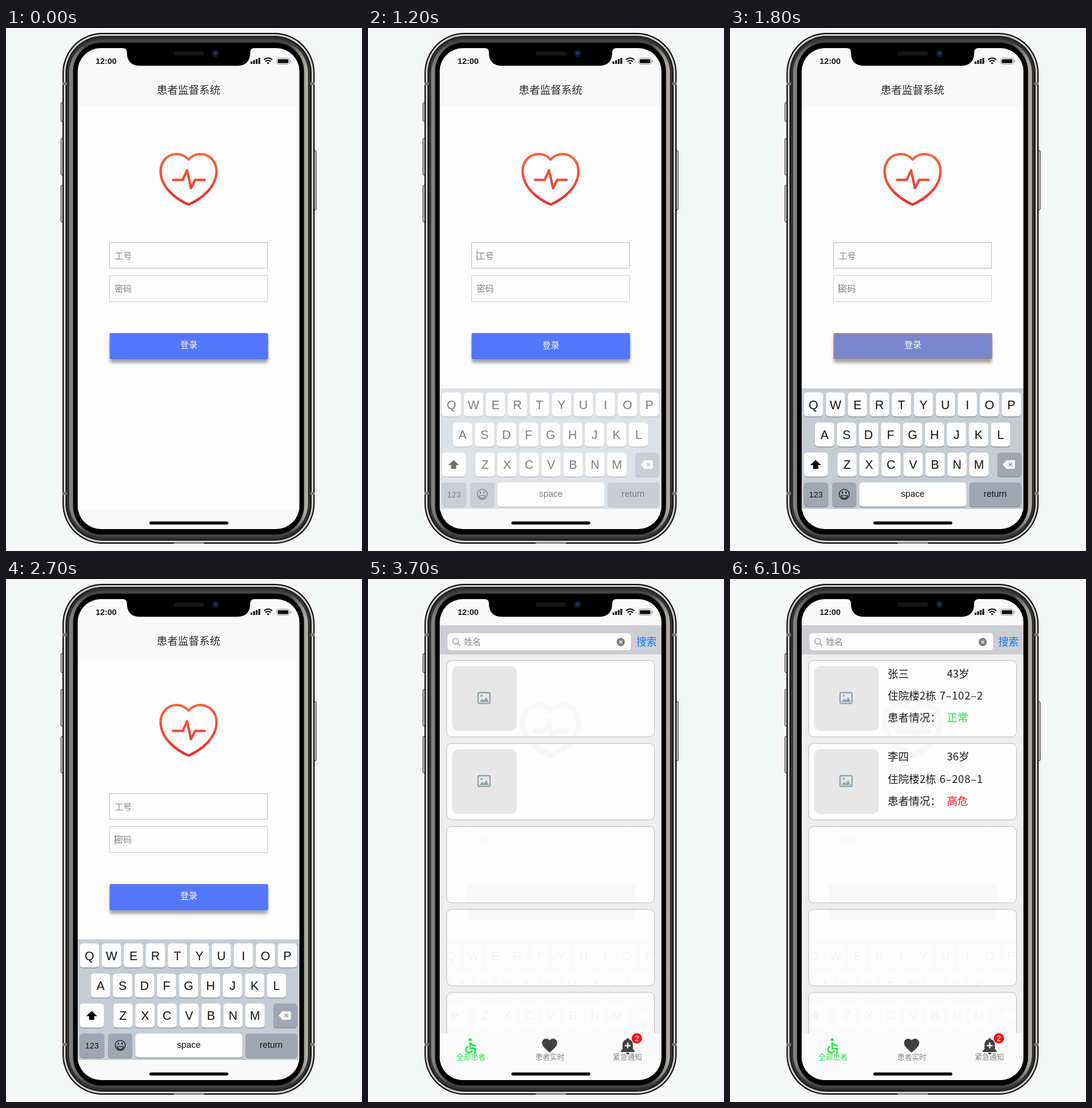
These frames come from a looping animation (586 by 859 pixels, 8 s). An HTML page:

```html
<!DOCTYPE html>
<html lang="zh-CN">
<head>
<meta charset="utf-8">
<title>患者监督系统</title>
<style>
html, body { margin: 0; width: 100%; height: 100%; overflow: hidden; background: #f5f6f6; }
svg { display: block; width: 586px; height: 859px; }
text { font-family: "Noto Sans CJK SC", "Noto Sans CJK", "Noto Sans", sans-serif; }
.latin, .key text { font-family: "Liberation Sans", Arial, sans-serif; }
.mid { text-anchor: middle; }
.thin { font-weight: 300; }
.info { font-size: 17.5px; fill: #1c1c1c; }
.info1 { fill: #333; }
.heart { stroke-width: var(--line, 4px); }
.ghost { --line: 9px; filter: grayscale(1); opacity: .04; }

/* every change is a hard cut on one 8 s clock */
.login, .list, .kbd, .caret1, .caret2, .hot, .nudge, .labels, .lens, .info1, .info2 {
  animation: 8s step-end infinite;
}
.login { animation-name: login; }
.list { animation-name: list; }
.kbd { animation-name: kbd; }
.caret1 { animation-name: caret1; }
.caret2 { animation-name: caret2; }
.hot { animation-name: hot; }
.nudge { animation-name: nudge; }
.labels { animation-name: labels; }
.lens { animation-name: lens; }
.info1 { animation-name: info1; }
.info2 { animation-name: info2; }
@keyframes login { 0% { opacity: 1 } 36.25%, 100% { opacity: 0 } }
@keyframes list { 0% { opacity: 0 } 36.25%, 100% { opacity: 1 } }
@keyframes kbd {
  0% { opacity: 0 } 12.5% { opacity: .12 } 13.75% { opacity: .3 }
  15% { opacity: .54 } 16.25% { opacity: .8 } 17.5%, 100% { opacity: 1 }
}
@keyframes caret1 { 0% { opacity: 0 } 12.5% { opacity: 1 } 17.5%, 100% { opacity: 0 } }
@keyframes caret2 { 0% { opacity: 0 } 21.25% { opacity: 1 } 27.5% { opacity: 0 } 33.75%, 100% { opacity: 1 } }
@keyframes hot { 0% { opacity: 0 } 22.5% { opacity: 1 } 27.5%, 100% { opacity: 0 } }
@keyframes nudge { 0% { transform: none } 12.5% { transform: translateY(.8px) } 17.5%, 100% { transform: none } }
@keyframes labels { 0% { opacity: 0 } 42.5%, 100% { opacity: 1 } }
@keyframes lens { 0% { opacity: 0 } 46.25%, 100% { opacity: 1 } }
@keyframes info1 { 0% { opacity: 0 } 71.25% { opacity: 1 } 76.25%, 100% { opacity: 0 } }
@keyframes info2 { 0% { opacity: 0 } 76.25%, 100% { opacity: 1 } }
</style>
</head>
<body>
<svg viewBox="0 0 586 859">
  <defs>
    <linearGradient id="red" gradientUnits="userSpaceOnUse" x1="0" y1="205" x2="0" y2="292">
      <stop stop-color="#f4683f"/><stop offset="1" stop-color="#e62f2f"/>
    </linearGradient>
    <linearGradient id="steel">
      <stop stop-color="#868686"/><stop offset=".08" stop-color="#444"/>
      <stop offset=".92" stop-color="#444"/><stop offset="1" stop-color="#b9b5ae"/>
    </linearGradient>
    <filter id="soft" x="-10%" y="-40%" width="120%" height="200%"><feGaussianBlur stdDeviation="2.5"/></filter>
    <clipPath id="screen"><rect x="118" y="33" width="365" height="790" rx="38"/></clipPath>
    <clipPath id="cardClip"></clipPath>
  </defs>

  <!-- phone body -->
  <g fill="#d4d4d4" stroke="#222">
    <rect x="90.5" y="122.5" width="6" height="31" rx="1.5"/>
    <rect x="90.5" y="181.5" width="6" height="60" rx="1.5"/>
    <rect x="90.5" y="258.5" width="6" height="60" rx="1.5"/>
    <rect x="504.5" y="201.5" width="6" height="97" rx="1.5"/>
  </g>
  <rect x="93" y="8" width="415" height="839" rx="66" fill="#0a0a0a"/>
  <rect x="95" y="10" width="411" height="835" rx="64" fill="#c9caca"/>
  <rect x="98" y="13" width="405" height="829" rx="61" fill="#151515"/>
  <rect x="100" y="15" width="401" height="825" rx="59" fill="#333"/>
  <rect x="104" y="19" width="393" height="817" rx="55" fill="url(#steel)"/>
  <rect x="110.5" y="24" width="380" height="808" rx="47" fill="#000"/>
  <g fill="#777">
    <rect x="93" y="89" width="7" height="5"/><rect x="501" y="89" width="7" height="5"/>
    <rect x="93" y="762" width="7" height="5"/><rect x="501" y="762" width="7" height="5"/>
    <rect x="276" y="845" width="50" height="2"/>
  </g>

  <g clip-path="url(#screen)">
    <rect x="118" y="33" width="365" height="790" fill="#f9f9f9"/>

    <g class="login">
      <rect x="118" y="128" width="365" height="663" fill="#fdfdfd"/>
      <text class="mid thin" x="300.5" y="107.7" font-size="17.5" fill="#2a2a2a">患者监督系统</text>
      <g id="form">
        <g class="heart" fill="none" stroke="url(#red)" stroke-linecap="round" stroke-linejoin="round">
          <path d="M300.5 216C295 210 288 207 281 207C266 207 254.500 219 254.500 235C254.500 262 280 281 300.500 290C321 281 346.500 262 346.500 235C346.500 219 335 207 320 207C313 207 306 210 300.500 216Z"/>
          <path d="M275 249.500H291L298 233.500L304.500 263L311.500 249.500H327"/>
        </g>
        <rect x="170.500" y="352.500" width="260" height="42" fill="#fdfdfd" stroke="#bebebe"/>
        <rect x="170.500" y="406.500" width="260" height="43" fill="#fdfdfd" stroke="#d0d0d0"/>
        <g font-size="14" fill="#7c8488">
          <text class="nudge" x="179" y="378.500">工号</text>
          <text x="179" y="433.300">密码</text>
        </g>
        <rect x="171" y="507" width="260" height="43" rx="2" opacity=".35" filter="url(#soft)"/>
        <rect x="170.500" y="501" width="261" height="43" rx="2" fill="#5577ff"/>
      </g>
      <path class="caret1" d="M179.500 365.500V382" stroke="#777"/>
      <path class="caret2" d="M179.500 420V436" stroke="#777"/>
      <rect class="hot" x="171" y="501.500" width="260" height="42" rx="2" fill="#7986cb" stroke="#d9825a"/>
      <text class="mid nudge" x="301" y="525.400" font-size="14" fill="#fff">登录</text>
      <g class="kbd"><g id="keys"><rect x="118" y="592" width="365" height="198" fill="#c5ccd4"/></g></g>
    </g>

    <g class="list">
      <rect x="118" y="76" width="365" height="48" fill="#cdcdd1"/>
      <rect x="131" y="89" width="302" height="28" rx="5" fill="#fcfcfc"/>
      <g class="lens" fill="none" stroke="#8b8b8b" stroke-width="1.300" stroke-linecap="round">
        <circle cx="144.300" cy="102.300" r="4.600"/><path d="M147.800 105.800L151.500 109.500"/>
      </g>
      <circle cx="416" cy="103.500" r="6.700" fill="#7b7f84"/>
      <path d="M413.700 101.200l4.600 4.600m0-4.600l-4.600 4.600" stroke="#fff" stroke-width="1.200"/>
      <rect x="118" y="124" width="365" height="667" fill="#eee"/>
      <g id="cards" fill="#fdfdfd" stroke="#bcbcbc"></g>
      <g clip-path="url(#cardClip)">
        <g class="ghost">
          <use href="#form"/>
          <rect x="163" y="500" width="277" height="60" rx="8" fill="#888"/>
          <use href="#keys"/>
        </g>
      </g>
      <g id="pics"></g>
      <g class="info info1 thin" id="info1"></g>
      <g class="info info2" id="info2"></g>

      <rect x="118" y="746" width="365" height="77" fill="#fafafa"/>
      <g transform="translate(153.700 751.500) scale(1.260)" fill="none" stroke="#2be24c" stroke-width="2.100">
        <circle cx="11.500" cy="4.200" r="2" fill="#2be24c" stroke="none"/>
        <path d="M11.500 7.500V15.600H17.800V22M11.500 8.500Q14.500 12 18.800 12M9 13.200A4 4 0 1 0 13.900 18"/>
      </g>
      <path transform="translate(284 751.300) scale(1.250)" fill="#404040" d="M12 21.350L10.550 20C5.400 15.400 2 12.300 2 8.500C2 5.400 4.400 3 7.500 3C9.200 3 10.900 3.800 12 5.100C13.100 3.800 14.800 3 16.500 3C19.600 3 22 5.400 22 8.500C22 12.300 18.600 15.400 13.450 20Z"/>
      <path fill="#404040" d="M427.500 754q2 0 2 2.200c5 1 6.500 5 6.500 9v6.500l2.800 3.300v2h-22.600v-2l2.800-3.300v-6.500c0-4 1.500-8 6.500-9q0-2.200 2-2.200zM424.500 778h6q-.5 3-3 3t-3-3z"/>
      <path d="M427.500 761.500v9.600m-4.800-4.800h9.600" stroke="#fff" stroke-width="2.200"/>
      <circle cx="442.500" cy="754.500" r="8.500" fill="#f5100f"/>
      <g class="labels">
        <text x="158" y="108.400" font-size="14" fill="#858585">姓名</text>
        <text x="441.700" y="109.400" font-size="16.800" fill="#0a7bff">搜索</text>
        <g class="mid" font-size="12" fill="#828282">
          <text x="169.500" y="790" font-weight="500" fill="#2be24c">全部患者</text>
          <text x="299.500" y="790">患者实时</text>
          <text x="427" y="790">紧急通知</text>
          <text class="latin" x="442.500" y="759" font-size="13" fill="#fff">2</text>
        </g>
      </g>
    </g>

    <!-- status bar and home bar -->
    <path d="M192 33Q199 33 199 40Q199 62 221 62H380Q402 62 402 40Q402 33 409 33Z"/>
    <text class="latin" x="147.500" y="59" font-size="13.500" font-weight="700" fill="#111">12:00</text>
    <path d="M404 59v-4m4.300 4v-6m4.300 6v-8m4.300 8v-10" stroke="#111" stroke-width="3"/>
    <g fill="none" stroke="#111" stroke-width="2">
      <path d="M424.700 52.300Q431.500 46.300 438.300 52.300M427 55.200Q431.500 51.300 436 55.200"/>
      <path d="M429.200 57.200Q431.500 55.600 433.800 57.200L431.500 59.700Z" fill="#111" stroke="none"/>
    </g>
    <rect x="445.500" y="49.500" width="21" height="10" rx="3" fill="none" stroke="#999"/>
    <rect x="447.200" y="51.200" width="17.600" height="6.600" rx="1.500" fill="#111"/>
    <rect x="467.500" y="52.500" width="1.500" height="4" rx=".7" fill="#999"/>
    <rect x="236" y="810.500" width="130" height="5" rx="2.500"/>
  </g>
  <rect x="276" y="38.500" width="50" height="7" rx="3.500" fill="#171717"/>
  <circle cx="345" cy="42" r="6.300" fill="#10131d"/>
  <circle cx="345" cy="41.500" r="3" fill="#1d3566"/>
</svg>
<script>
const $ = id => document.getElementById(id);
const add = (id, markup) => $(id).insertAdjacentHTML('beforeend', markup);

// keyboard
const key = (x, y, w, inner, fill = '#fdfdfd') => add('keys', `<g class="key mid">
  <rect x="${x}" y="${y + 1.2}" width="${w}" height="39.500" rx="5" fill="#878c94"/>
  <rect x="${x}" y="${y}" width="${w}" height="39.500" rx="5" fill="${fill}"/>${inner}</g>`);
const label = (x, y, size, s) => `<text x="${x}" y="${y}" font-size="${size}" fill="#111">${s}</text>`;
const dark = '#a0a7b2';

[['QWERTYUIOP', 121.5, 598.5], ['ASDFGHJKL', 139.8, 648], ['ZXCVBNM', 176.8, 697.3]]
  .forEach(([row, x0, y]) => [...row].forEach((c, i) => {
    const x = x0 + i * 36.2;
    key(x, y, 31.8, label(x + 15.9, y + 27, 20, c));
  }));
key(121.5, 697.3, 39.5, '<path d="M141 709.500l9 8.500h-4.800v6h-8.400v-6h-4.800z"/>');
key(440, 697.3, 39.5, `<path d="M449 717l6-7h12q2 0 2 2v10q0 2-2 2h-12z" fill="#fff"/>
  <path d="M458.500 714l6 6m0-6l-6 6" stroke="#888" stroke-width="1.300"/>`, dark);
key(121.5, 746.5, 40.5, label(141.5, 771, 13.4, '123'), dark);
key(168, 746.5, 40, `<g fill="none" stroke="#111" stroke-width="1.200"><circle cx="188" cy="766" r="8.300"/>
  <path d="M182.500 768h11q-1 4.500-5.500 4.500t-5.500-4.500z"/>
  <path d="M185 761.500v3m6-3v3" stroke-width="2"/></g>`, dark);
key(213, 746.5, 176, label(301, 770, 14.6, 'space'));
key(394, 746.5, 85.5, label(436.5, 770, 14.5, 'return'), dark);

// patient cards
for (let i = 0; i < 5; i++) {
  const card = `<rect x="129.500" y="${133.8 + i * 136.3}" width="342" height="125.500" rx="8"/>`;
  add('cards', card);
  add('cardClip', card);
}
for (const y of [0, 136.4]) add('pics', `<g transform="translate(0 ${y})">
  <rect x="138.500" y="143" width="106.500" height="106.500" rx="10" fill="#e7e7e7"/>
  <rect x="181.200" y="186.700" width="19.600" height="17.600" rx="2" fill="none" stroke="#90a4ae" stroke-width="2.200"/>
  <path d="M183.500 202l4.500-5.500 2.800 3 3.700-5.500 4.500 8z" fill="#90a4ae"/>
  <circle cx="187" cy="191.800" r="1.700" fill="#90a4ae"/></g>`);

const patients = [
  ['张三', '43岁', '7-102-2', '正常', '#1fe03f'],
  ['李四', '36岁', '6-208-1', '高危', '#f5161b']
];
const fill = (id, pitch, gap, dash) => patients.forEach(([name, age, bed, state, color], i) => {
  const y = 161.8 + i * pitch;
  const t = (x, row, s, extra = '') => `<text x="${x}" y="${y + row * 36.2}" ${extra}>${s}</text>`;
  add(id, t(259.5, 0, name) + t(357, 0, age) + t(259.5, 1, '住院楼2栋')
    + t(345, 1, bed.replaceAll('-', dash), `letter-spacing="${gap}"`)
    + t(259.5, 2, '患者情况：') + t(357, 2, state, `fill="${color}"`));
});
fill('info1', 137, .8, '-');
fill('info2', 136.6, .6, '–');
</script>
</body>
</html>
```
